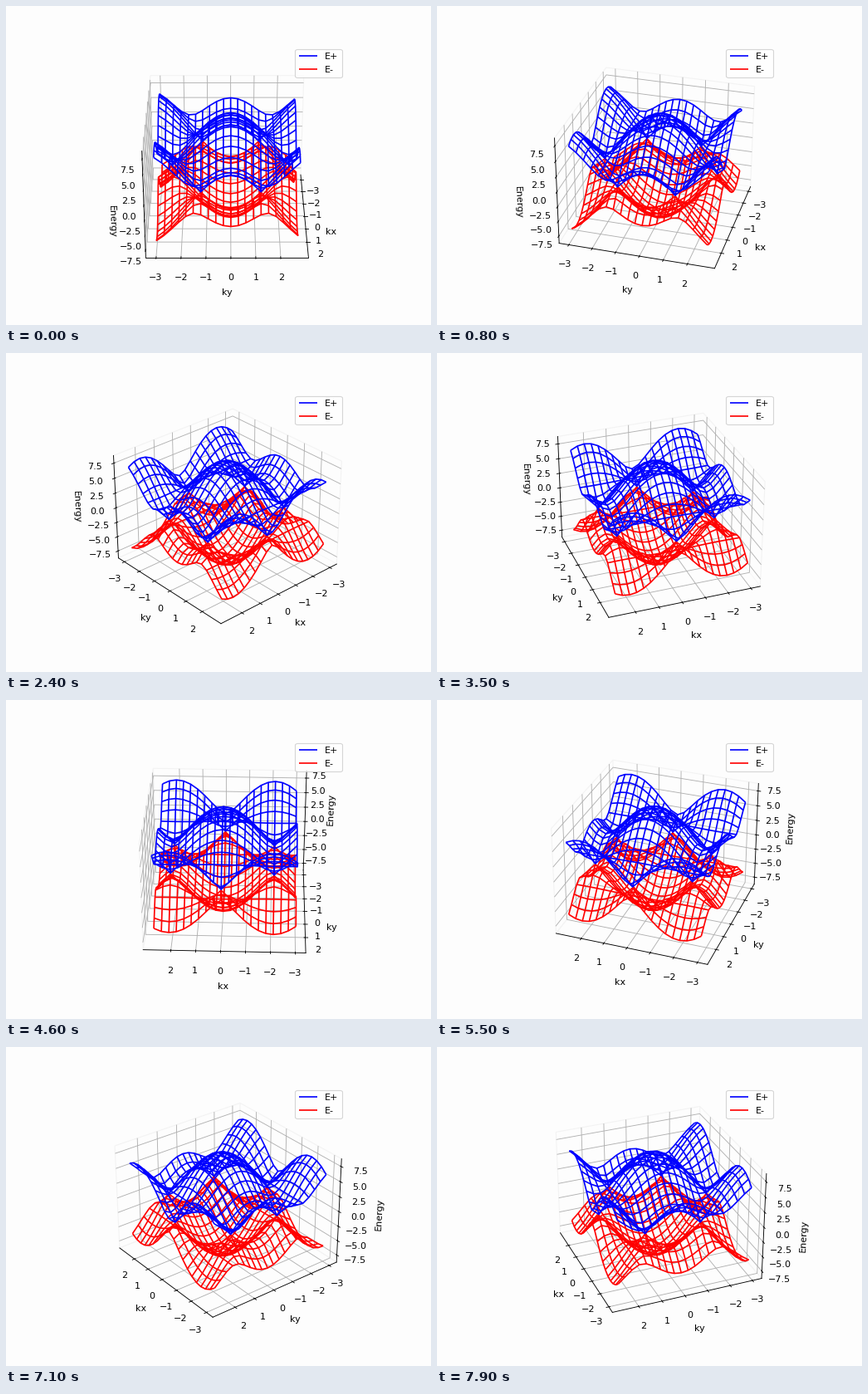
A matplotlib script that plays this animation: 512x384 px, repeating every 8 s.

```python
import numpy as np
import matplotlib.pyplot as plt
from matplotlib.animation import FuncAnimation

FRAMES, INTERVAL = 80, 100
HOPPING = 2.8
BACKGROUND = "#fdfdfd"


def band(kx, ky):
    """Upper band of the honeycomb tight-binding model."""
    a = np.sqrt(3) * ky
    f2 = 3 + 2 * np.cos(a) + 4 * np.cos(a / 2) * np.cos(1.5 * kx)
    return HOPPING * np.sqrt(np.maximum(f2, 0))


def padded(lo, hi, margin):
    """Data margin, then the thin border around the 3D box."""
    pad = margin * (hi - lo)
    lo, hi = lo - pad, hi + pad
    edge = (hi - lo) / 48
    return lo - edge, hi + edge


fig = plt.figure(figsize=(6.4, 4.8), dpi=80, facecolor=BACKGROUND)
ax = fig.add_subplot(projection="3d", facecolor=BACKGROUND)

k = -3 + 0.3 * np.arange(20)
kx, ky = np.meshgrid(k, k)
energy = band(kx, ky)
ax.plot_wireframe(kx, ky, energy, color="blue", label="E+")
ax.plot_wireframe(kx, ky, -energy, color="red", label="E-")

ax.set(xlabel="kx", ylabel="ky", zlabel="Energy")
ax.set_xticks(range(-3, 3))
ax.set_yticks(range(-3, 3))
ax.set_zticks(np.arange(-7.5, 8, 2.5))
ax.set_xlim(*padded(k[0], k[-1], 0.05))
ax.set_ylim(*padded(k[0], k[-1], 0.05))
ax.set_zlim(*padded(-energy.max(), energy.max(), 0))
for axis in (ax.xaxis, ax.yaxis, ax.zaxis):
    axis.pane.set(facecolor=BACKGROUND, edgecolor="#f3f3f3", alpha=1)
ax.legend(loc="upper right")


def update(i):
    ax.view_init(elev=30, azim=2 * i)
    return ()


anim = FuncAnimation(fig, update, frames=FRAMES, interval=INTERVAL,
                     repeat=True, repeat_delay=0)
plt.show()
```
